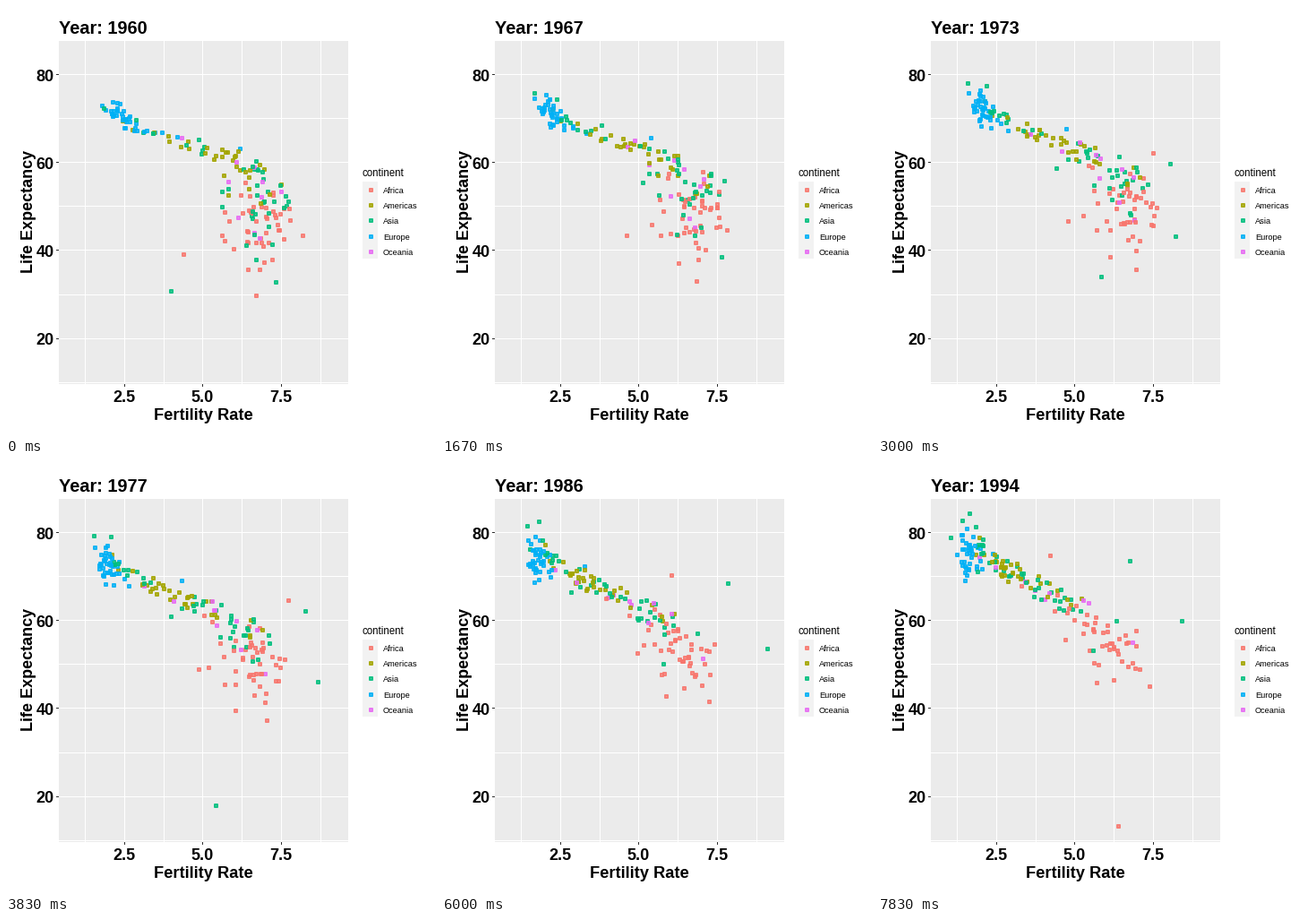
A matplotlib script that plays this animation: 480 px wide and 480 px high, repeating every 8000 ms.

```python
import numpy as np
import matplotlib.pyplot as plt
from matplotlib.animation import FuncAnimation
from matplotlib.patches import Rectangle

SIZE, DPI = 480, 72
FRAMES, INTERVAL = 48, 166
YEARS = 1960 + 0.727 * np.arange(FRAMES)
T = np.linspace(0, 1, FRAMES)
COLORS = {"Africa": "#F8766D", "Americas": "#A3A500", "Asia": "#00BF7D",
          "Europe": "#00B0F6", "Oceania": "#E76BF3"}

plt.rcParams["font.family"] = ["Liberation Sans", "DejaVu Sans"]
rng = np.random.default_rng(11)
paths, tints = [], []


def px(fertility):
    return 44.85 + 35 * fertility


def py(life):
    return 469.65 - 4.92 * life


def blend(start, end):
    return start + (end - start) * T


def add(name, fertility, life):
    # Snap to pixel centres for crisp dots
    spots = np.stack([px(fertility), py(life)], axis=1)
    paths.append(np.floor(spots) + 0.5)
    tints.append(COLORS[name])


def wander():
    """Bounded random offset that slowly changes over the loop."""
    a, b = np.clip(rng.normal(size=2), -1.9, 1.9)
    return a * np.cos(0.9 * T) + b * np.sin(0.9 * T)


def continent(name, count, life, spread, middle=(64.5, 66.5)):
    """Life expectancy rises; fertility falls along a logistic curve."""
    low = blend(2.1, 1.5)
    for _ in range(count):
        years = blend(*life) + blend(*spread) * wander()
        drop = np.exp((years - blend(*middle)) / blend(2.2, 5))
        excess = blend(4.6, 5) / (1 + drop)
        add(name, low + excess + (0.2 + 0.08 * excess) * wander(), years)


def country(name, start, end, year=1980, width=1, shift=(0, 0)):
    """A lone dot on a straight course with one bump around a year."""
    bump = np.exp(-((YEARS - year) / width) ** 2 / 2)
    add(name, *(blend(a, b) + s * bump for a, b, s in zip(start, end, shift)))


continent("Africa", 44, (45.5, 55.5), (5.2, 5.3))
continent("Americas", 34, (60.5, 71.5), (5.2, 4))
continent("Asia", 40, (55, 69.5), (9, 6))
continent("Europe", 38, (69.8, 74.8), (2.2, 3.6), (64, 56))
continent("Oceania", 10, (57, 67), (7.5, 6))

country("Africa", (8.2, 43.3), (6.4, 49), 1994.2, 0.35, (0, -36))
country("Africa", (6.7, 29.7), (7.4, 45))
country("Africa", (4.4, 39), (5.4, 59))
country("Africa", (7.2, 53), (4, 74.5), 1979, 7, (2.2, 1))
country("Asia", (6.4, 41), (5.6, 53), 1977, 2.9, (-0.6, -29))
country("Asia", (6, 51), (1.9, 71), 1960, 1.5, (-2, -20.3))
country("Asia", (7.3, 32.7), (7.85, 59.8), 1983, 8, (1.5, 0))
country("Asia", (7.7, 51), (6.4, 73.5), 1981, 8, (1.4, 0))
country("Asia", (4.9, 65), (1.1, 78.7), 1978, 7, (-0.9, 1))
country("Europe", (6.2, 63), (2.4, 75))

order = rng.permutation(len(paths))
paths = np.array(paths)[order]
tints = [tints[i] for i in order]

fig = plt.figure(figsize=(SIZE / DPI, SIZE / DPI), dpi=DPI, facecolor="white")
ax = fig.add_axes([0, 0, 1, 1])
ax.set(xlim=(0, SIZE), ylim=(SIZE, 0))
ax.axis("off")


def box(x, y, w, h, color):
    ax.add_patch(Rectangle((x, y), w, h, color=color, lw=0, antialiased=False))


def label(x, y, text, size, **kw):
    return ax.text(x, y, text, fontsize=size, va="baseline", **kw)


def dots(xy, colors):
    return ax.scatter(*np.transpose(xy), s=13, c=colors, alpha=0.7,
                      linewidths=0.8, antialiased=False, zorder=3)


# Panel, grid and axes
box(59, 39, 323, 383, "#EBEBEB")
for i in range(1, 8):
    x = int(px(1.25 * i))
    box(x, 39, 1, 383, "white")
    if i % 2 == 0:
        box(x, 422, 1, 3, "#333333")
        label(x, 442.5, f"{1.25 * i:.1f}", 18, weight="bold", ha="center")
for value in range(10, 90, 10):
    y = int(py(value))
    box(59, y, 323, 1, "white")
    if value % 20 == 0:
        box(56, y, 3, 1, "#333333")
        label(54, y + 7.5, value, 18, weight="bold", ha="right")
label(220, 462, "Fertility Rate", 18.3, weight="bold", ha="center")
label(30, 229.5, "Life Expectancy", 18, weight="bold", ha="center",
      rotation=90, rotation_mode="anchor")
title = label(59, 31, "", 20, weight="bold")

# Legend
label(398, 190.5, "continent", 11.5)
box(398, 196, 17, 86, "#F2F2F2")
rows = np.floor(205.3 + 17.28 * np.arange(len(COLORS))) + 0.5
for y, name in zip(rows, COLORS):
    label(421, y + 3.3, name, 9.2)
dots([(407.5, y) for y in rows], list(COLORS.values()))

points = dots(paths[:, 0], tints)


def update(k):
    title.set_text(f"Year: {round(YEARS[k])}")
    points.set_offsets(paths[:, k])
    return title, points


anim = FuncAnimation(fig, update, frames=FRAMES, interval=INTERVAL,
                     repeat=True, repeat_delay=0)
plt.show()
```
